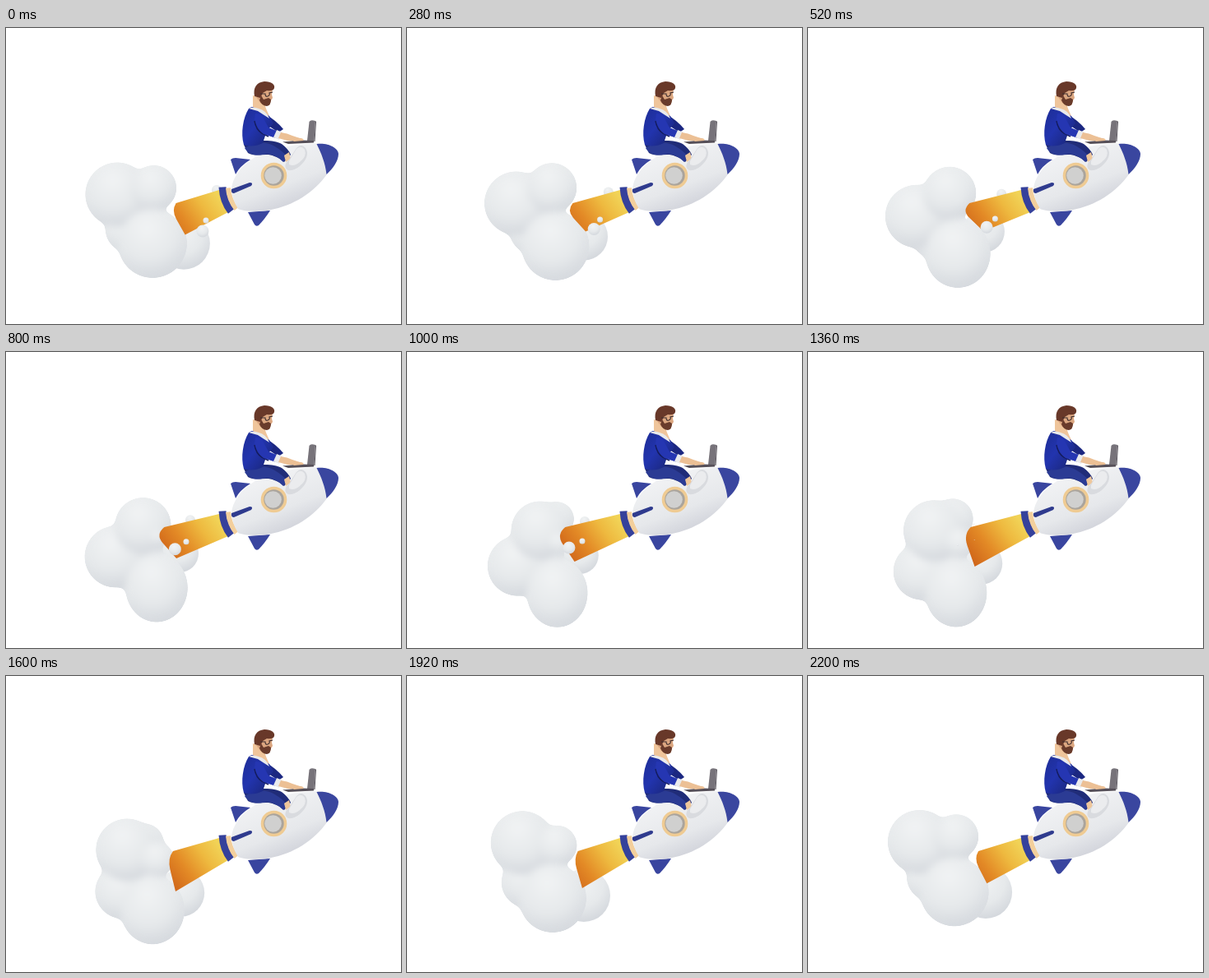
These frames come from a looping animation (480x360 px, 2.24 s). An HTML page:

```html
<!DOCTYPE html>
<html lang="en">
<head>
<meta charset="utf-8">
<title>Rocket ride</title>
<style>
html, body { margin: 0; width: 100%; height: 100%; overflow: hidden; background: #fff; }
svg { display: block; width: 100vw; height: 100vh; }
</style>
</head>
<body>
<svg viewBox="0 0 480 360">
  <defs>
    <radialGradient id="puff" cx=".42" cy=".27" r=".82">
      <stop offset="0" stop-color="#f1f3f4"/><stop offset=".55" stop-color="#e6e9eb"/><stop offset="1" stop-color="#cfd3d9"/>
    </radialGradient>
    <linearGradient id="fire" gradientUnits="userSpaceOnUse" x1="198" y1="252" x2="260" y2="207">
      <stop offset="0" stop-color="#d0661a"/><stop offset=".35" stop-color="#e38a26"/>
      <stop offset=".7" stop-color="#eeb93f"/><stop offset="1" stop-color="#f1d357"/>
    </linearGradient>
    <linearGradient id="hull" gradientUnits="userSpaceOnUse" x1="318" y1="150" x2="345" y2="220">
      <stop offset="0" stop-color="#f1f2f4"/><stop offset=".6" stop-color="#e6e8eb"/><stop offset="1" stop-color="#cfd1d9"/>
    </linearGradient>
    <linearGradient id="shirt" x1="0" y1="0" x2="1" y2="1">
      <stop offset="0" stop-color="#1d2c94"/><stop offset=".45" stop-color="#2234ae"/><stop offset="1" stop-color="#18236f"/>
    </linearGradient>
    <filter id="merge" filterUnits="userSpaceOnUse" x="75" y="145" width="190" height="210" color-interpolation-filters="sRGB">
      <feGaussianBlur stdDeviation="4.5"/>
      <feColorMatrix values="1 0 0 0 0  0 1 0 0 0  0 0 1 0 0  0 0 0 18 -8.3"/>
    </filter>
  </defs>

  <g id="behind" fill="url(#puff)"></g>
  <g id="cloud" fill="url(#puff)" filter="url(#merge)"></g>
  <path id="flame" fill="url(#fire)"/>
  <g id="front" fill="url(#puff)"></g>

  <g id="rocket">
    <g fill="#39459f">
      <path d="M273 160Q275 158 279 158L297 160Q284 168 279 178Z"/>
      <path d="M294 224L321 222Q314 233 307 240Q304 242 302 239Z"/>
    </g>
    <path fill="none" stroke="#35419b" stroke-width="9" d="M263 193.500Q264 211 273.500 223"/>
    <path fill="none" stroke="#f3cf9c" stroke-width="6" d="M270 194.500Q271 209 280 220"/>
    <path fill="url(#hull)" d="M274 196C276 178 290 163 307 155C330 145 356 140 379 140.500C391 140 404 146 404 153C404 162 397 171 390 178C374 200 350 216 320 221.500C305 224 290 223 282 220Q275 209 274 196Z"/>
    <path fill="#3a469f" d="M377.500 141C391 139 404 146 404 153C404 162 397 171 389.500 178C388 164 383 152 377.500 141Z"/>
    <path fill="#2f3b8e" d="M274 196L296 188Q301 188 298 192L277 201Q273 201 274 196Z"/>
    <circle cx="325.500" cy="179.500" r="14" fill="#aaa49c" stroke="#efcb93" stroke-width="3.600"/>
    <circle cx="324.500" cy="179.500" r="10.300" fill="#d0d0cf"/>
  </g>

  <g id="rider">
    <path fill="#1b2781" d="M315 105Q328 112 337 123L331 127L316 117Z"/>
    <path fill="#202c78" d="M289 142C302 136 324 135 335 141Q343 147 346 154L338 163Q333 158 326 156C316 151 304 158 294 152Z"/>
    <path fill="#2b3b94" d="M290 146C302 138 316 138 325 143Q337 150 342 157L337 163Q328 154 317 153C306 156 295 155 290 146Z"/>
    <path fill="#efc79b" d="M338 155L344 151L346 159L340 163Z"/>
    <path fill="#d9dbdf" d="M343 173C338 171 338 165 344 160L353 146Q359 140 364 146C369 153 364 162 357 168Q350 174 343 173Z"/>
    <path fill="#ebecee" d="M344 162L353 147Q359 142 363 148Q366 156 357 163Q350 169 344 166Z"/>

    <path fill="url(#shirt)" d="M295 98Q300 94 307 97L320 107L325 116L317 125L312 140Q300 146 289 142C285 128 288 109 295 98Z"/>
    <path fill="#efc59b" d="M300 82L312 86L316 98Q318 103 320 107Q309 102 300 96Z"/>
    <path fill="#e9eaec" d="M295 98Q300 95 307 98Q316 100 320 110Q312 105 306 101Z"/>
    <path fill="none" stroke="#141c5d" stroke-width="1.500" d="M302 113Q304 124 311 128L319 132"/>
    <path fill="#2536b2" d="M303 104Q310 103 314 112L319 121L331 126L328 134L313 129Q305 123 302 111Z"/>
    <path fill="#e9eaec" d="M329 124L336 127L332 136L325 133Z"/>
    <path fill="#ecc095" d="M334 127Q342 128 348 131L360 135Q361 138 356 138L342 137L331 134Z"/>

    <path fill="#dba680" d="M310 74L324 73L323 81L324 85L322 88L320 94L309 91L304 84Z"/>
    <path fill="#693b2b" d="M310 82L313 87L319 85L322 87Q322 94 317 95Q311 95 308 88Z"/>
    <path fill="#683829" d="M302 83C300 73 304 66 314 65C323 65 327 69 326 73Q325 77 317 76L312 79L309 85Z"/>
    <path fill="none" stroke="#3b2b2c" stroke-width="1.100" d="M309 80L315 80Q315 84 318 83Q321 82 320 79L324 78"/>

    <path fill="#77737a" d="M366 137L368.500 114Q370 111 376 113L374.500 138Z"/>
    <path fill="#5b575f" d="M374.500 138L376 113L377 114L375.500 138Z"/>
    <path fill="#565059" d="M336 138.500L359 136.500L374 137V139.500L343 141Z"/>
    <path fill="#ecc095" d="M344 133L358 134Q363 135 361 137L350 138Z"/>
  </g>
</svg>
<script>
const PERIOD = 2240;
const LIFETIME = PERIOD * 11 / 3;
const BIRTH = PERIOD / 6;
const BILLOWS = 4;
const $ = id => document.getElementById(id);

const clamp01 = v => Math.max(0, Math.min(1, v));
const smoothstep = v => v * v * (3 - 2 * v);
const wave = (t, mid, amp, phase) => mid + amp * Math.cos(2 * Math.PI * t / PERIOD + phase);
const bob = t => wave(t, 0, -16.5, -0.15);

// A billow swells beside the flame, orbits over the top and sinks on the left.
function billow(t) {
  const life = clamp01((t - BIRTH) / LIFETIME);
  const turn = smoothstep(clamp01((life * 11 - 1.2) / 8));
  const angle = (30 + 220 * turn) * Math.PI / 180;
  const r = 39 * Math.max(0, Math.sin(Math.PI * life)) ** 0.8;
  return [160 + 28 * Math.cos(angle), 233 - 31 * Math.sin(angle) + bob(t), r];
}

const belly = t => [wave(t, 180, -3, 0.9), 278.5 + bob(t), wave(t, 39.5, 2.5, 0), 42];
const flank = t => [wave(t, 213, 3, 0), wave(t, 256, 11, 1), wave(t, 27.5, 5, 0.5)];
const crown = t => [wave(t, 170, 12, -2.77), 203, wave(t, 18, 7, -3.9)];
const core = () => [160, 245, 30];

// Droplets drift into the cloud and vanish until the next loop.
const droplet = (x, y, r, vx, vy) => t => [x + vx * t, y + vy * t, r * clamp01((1400 - t) / 300)];

function addBlob(layer, shape) {
  const el = document.createElementNS("http://www.w3.org/2000/svg", "ellipse");
  $(layer).append(el);
  return t => {
    const [cx, cy, rx, ry = rx] = shape(t);
    Object.entries({ cx, cy, rx, ry }).forEach(([name, value]) => el.setAttribute(name, value));
  };
}

const parts = [
  addBlob("behind", flank),
  addBlob("behind", droplet(256, 197, 6, -0.04, 0.009)),
  addBlob("cloud", crown),
  addBlob("cloud", core),
  ...Array.from({ length: BILLOWS + 1 }, (_, i) => addBlob("cloud", t => billow(t + (BILLOWS - i) * PERIOD))),
  addBlob("cloud", belly),
  addBlob("front", droplet(239, 247, 7.5, -0.042, -0.009)),
  addBlob("front", droplet(243, 234, 3.5, -0.03, -0.004))
];

function drawFlame(t) {
  const top = wave(t, 200, 8, 0.6);
  const corner = wave(t, 192, 11, 0.6);
  const bottom = wave(t, 210, 8, -0.3);
  const bottomY = wave(t, 254.5, 7.5, Math.PI / 2 + 0.4);
  const midX = corner + (bottom - corner) * 0.35;
  const midY = 222 + (bottomY - 222) * 0.35;
  $("flame").setAttribute("d", `M259 197L${top} 213Q${corner} 222 ${midX} ${midY}L${bottom} ${bottomY}L270 224Z`);
}

function render(t) {
  parts.forEach(update => update(t));
  drawFlame(t);
}

const start = performance.now();
function tick() {
  render((performance.now() - start) % PERIOD);
  requestAnimationFrame(tick);
}
render(0);
requestAnimationFrame(tick);
</script>
</body>
</html>
```
